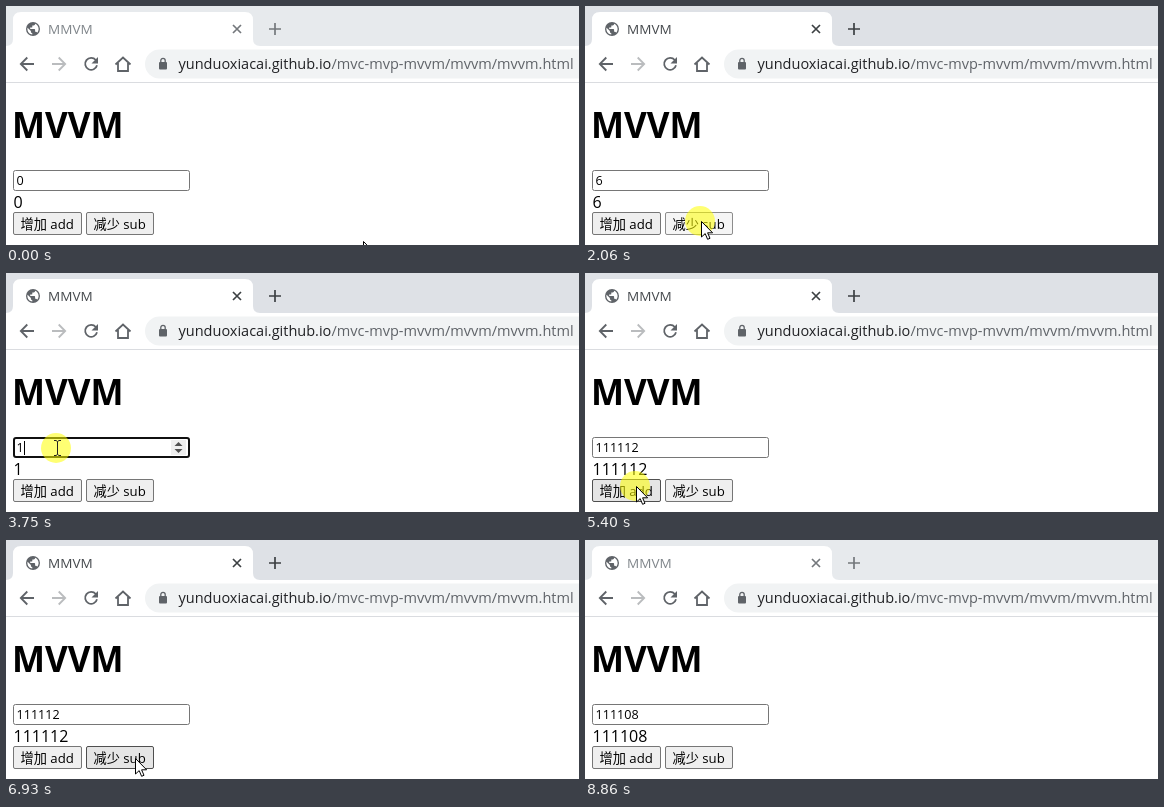
These frames come from a looping animation (573 px wide and 239 px high, 8.94 s). An HTML page:

```html
<!DOCTYPE html>
<html lang="zh">
<head>
<meta charset="utf-8">
<title>MMVM</title>
<style>
  html, body { margin: 0; width: 100%; height: 100%; overflow: hidden; background: #fff; }
  svg { display: block; width: 100%; height: 100%; }
  text { font-family: "Open Sans", "Noto Sans", "Noto Sans CJK SC", "Noto Sans CJK", sans-serif; white-space: pre; }
  .line { fill: none; stroke: #5f6368; stroke-width: 1.8; }
  .box { fill: #efefef; stroke: #767676; }
  .box.hover { fill: #e5e5e5; stroke: #4f4f4f; }
  .box.down { fill: #f5f5f5; stroke: #8d8d8d; }
  .label { font-size: 13.2px; }
  #field { fill: #fff; stroke: #767676; }
  #field.hover { stroke: #4f4f4f; }
  #field.focus { stroke: #101010; stroke-width: 2; }
  #strip { fill: #e7eaed; }
  #title { fill: #80868b; }
  #marks { stroke: #74787c; }
  .active #strip { fill: #dee1e6; }
  .active #title { fill: #45494d; }
  .active #marks { stroke: #3c4043; }
</style>
</head>
<body>
<svg id="stage" viewBox="0 0 573 239" xmlns="http://www.w3.org/2000/svg">
  <rect width="573" height="239" fill="#fff"/>
  <!-- browser bar -->
  <rect id="strip" width="573" height="40"/>
  <path d="M0 40Q7 40 7 33V14Q7 6 15 6H239Q247 6 247 14V33Q247 40 254 40Z" fill="#fff"/>
  <path transform="translate(18.600 14.600) scale(.7)" fill="#5f6368" d="M12 2a10 10 0 1 0 0 20a10 10 0 1 0 0 -20zm-1 17.930c-3.950-.490-7-3.850-7-7.930 0-.620.080-1.210.210-1.790L9 15v1c0 1.100.900 2 2 2zm6.900-2.540c-.260-.810-1-1.390-1.900-1.390h-1v-3c0-.550-.450-1-1-1H8v-2h2c.550 0 1-.450 1-1V7h2c1.100 0 2-.900 2-2v-.410c2.930 1.190 5 4.060 5 7.410 0 2.080-.800 3.970-2.100 5.390z"/>
  <text id="title" x="42" y="28" font-size="13.5">MMVM</text>
  <path id="marks" d="M227 19L235 27M235 19L227 27M263 23H275M269 17V29" fill="none" stroke-width="1.7"/>
  <path class="line" d="M28 58H15M21.300 51.500L14.800 58 21.300 64.500"/>
  <path class="line" d="M46 58H59M52.700 51.500L59.200 58 52.700 64.500" style="stroke:#babcbe"/>
  <path class="line" d="M89.800 54A6 6 0 1 0 91 59.300"/>
  <path d="M92 51V57.500H85.500Z" fill="#5f6368"/>
  <path class="line" d="M109.500 58.500L117 51.500 124.500 58.500M112 57V65H122V57"/>
  <rect x="139" y="43.500" width="460" height="29" rx="14.500" fill="#f1f3f4"/>
  <rect x="153" y="56" width="8" height="7.500" rx="1" fill="#5f6368"/>
  <path class="line" d="M154.800 56.500V54.500A2.200 2.200 0 0 1 159.200 54.500V56.500" style="stroke-width:1.300"/>
  <text y="63" font-size="14.5" fill="#202124"><tspan x="172.500">yunduoxiacai.github.io</tspan><tspan x="325.500" fill="#5f6368">/mvc-mvp-mvvm/mvvm/mvvm.html</tspan></text>
  <rect y="76" width="573" height="1" fill="#dadce0"/>
  <!-- page -->
  <text x="6" y="132" font-size="35" font-weight="700">MVVM</text>
  <rect id="field" rx="2"/>
  <g id="spinner">
    <rect x="165" y="167" width="15" height="15" fill="#efefef"/>
    <path d="M168.500 173L172.500 169 176.500 173ZM168.500 176L172.500 180 176.500 176Z" fill="#505050"/>
  </g>
  <text id="typed" x="10.500" y="179" font-size="12.6"></text>
  <rect id="caret" y="168" width="1" height="14"/>
  <text id="output" x="7.500" y="202" font-size="16"></text>
  <rect id="add" class="box" x="7.500" y="206.500" width="68" height="22" rx="1.500"/>
  <text class="label" x="14.500" y="222.500">增加 add</text>
  <rect id="sub" class="box" x="80.500" y="206.500" width="67" height="22" rx="1.500"/>
  <text class="label" x="87.500" y="222.500">减少 sub</text>
  <!-- pointer -->
  <g id="pointer">
    <circle id="flash" cx="-1" cy="0" r="15" fill="#ff0" fill-opacity=".55"/>
    <path id="arrow" d="M.5 .5V16L4.200 12.600 6.600 18.300 9 17.300 6.600 11.800H11.600Z" fill="#fff" stroke="#000"/>
    <path id="beam" d="M-3 -7.500H-1L.5 -6.500 2 -7.500H4M.5 -6.500V6.500M-3 7.500H-1L.5 6.500 2 7.500H4" fill="none" stroke="#222"/>
  </g>
</svg>
<script>
const LOOP = 8940, TICK = 76.5;
const $ = id => document.getElementById(id);

// press time, release time, button
const clicks = [
  ...[[610, 690], [760, 840], [910, 990], [1060, 1140], [1220, 1290], [1370, 1450]].map(c => [...c, "add"]),
  ...[[2060, 2140], [2220, 2290], [2370, 2450], [2520, 2600], [2980, 3060]].map(c => [...c, "sub"]),
  ...[[5230, 5400], [5480, 5550], [5700, 5780], [5860, 5930]].map(c => [...c, "add"]),
  ...[[6550, 6630], [6700, 6780], [6850, 6930], [7330, 7410], [7710, 7790], [7870, 7940], [8020, 8100]].map(c => [...c, "sub"])
];
const keys = [4370, 4440, 4610, 4680, 4850];
const edits = [
  ...clicks.map(([, up, id]) => [up, v => v + (id === "add" ? 1 : -1)]),
  ...keys.map(at => [at, v => v * 10 + 1])
].sort((a, b) => a[0] - b[0]);

// start time, number of steps, end point
const moves = [
  [70, 7, 55, 214], [1680, 3, 116, 215], [3130, 8, 51, 175], [3910, 5, 70, 175],
  [4850, 6, 51, 213], [6010, 7, 129, 218], [8250, 1, 132, 218]
];
const areas = { field: [7, 164, 184, 185], add: [7, 206, 76, 229], sub: [80, 206, 148, 229] };

const within = (t, a, b) => t >= a && t < b;
const show = (id, on) => $(id).setAttribute("visibility", on ? "inherit" : "hidden");

function setAttrs(id, attrs) {
  for (const name in attrs) $(id).setAttribute(name, attrs[name]);
}

function pointerAt(t) {
  let x = 357, y = 235;
  for (const [start, steps, toX, toY] of moves) {
    if (t < start) break;
    const p = Math.min(1, (Math.floor((t - start) / TICK + 0.1) + 1) / steps);
    const e = p * p * (3 - 2 * p);
    x += (toX - x) * e;
    y += (toY - y) * e;
  }
  return [Math.round(x), Math.round(y)];
}

function draw(t) {
  const value = String(edits.reduce((v, [at, edit]) => t >= at ? edit(v) : v, 0));
  const [x, y] = pointerAt(t);
  const visible = t < 8330 && !within(t, 4290, 4850);
  const over = id => {
    const [l, top, r, b] = areas[id];
    return t < 8330 && x >= l && x < r && y >= top && y < b;
  };
  const press = clicks.find(([down, up]) => within(t, down, up));
  const focus = within(t, 3750, 5230);

  $("stage").setAttribute("class", within(t, 610, 8860) ? "active" : "");
  $("typed").textContent = $("output").textContent = value;

  for (const id of ["add", "sub"]) {
    const state = press && press[2] === id ? " down" : over(id) ? " hover" : "";
    $(id).setAttribute("class", "box" + state);
  }

  const inset = focus ? 1 : 0.5;
  setAttrs("field", {
    class: focus ? "focus" : over("field") ? "hover" : "",
    x: 7 + inset, y: 164 + inset, width: 177 - 2 * inset, height: 21 - 2 * inset
  });
  show("spinner", focus || over("field"));

  const lastKey = keys.reduce((last, at) => t >= at ? at : last, 3750);
  show("caret", focus && (t - lastKey) % 1000 < 500);
  $("caret").setAttribute("x", Math.round(10.5 + value.length * 7.2));

  $("pointer").setAttribute("transform", `translate(${x} ${y})`);
  show("pointer", visible);
  show("flash", visible && (press || within(t, 3750, 3830) || within(t, 5400, 5480)));
  show("beam", visible && over("field"));
  show("arrow", visible && !over("field"));
}

const begin = performance.now();
function tick() {
  draw((performance.now() - begin) % LOOP);
  requestAnimationFrame(tick);
}
tick();
</script>
</body>
</html>
```
